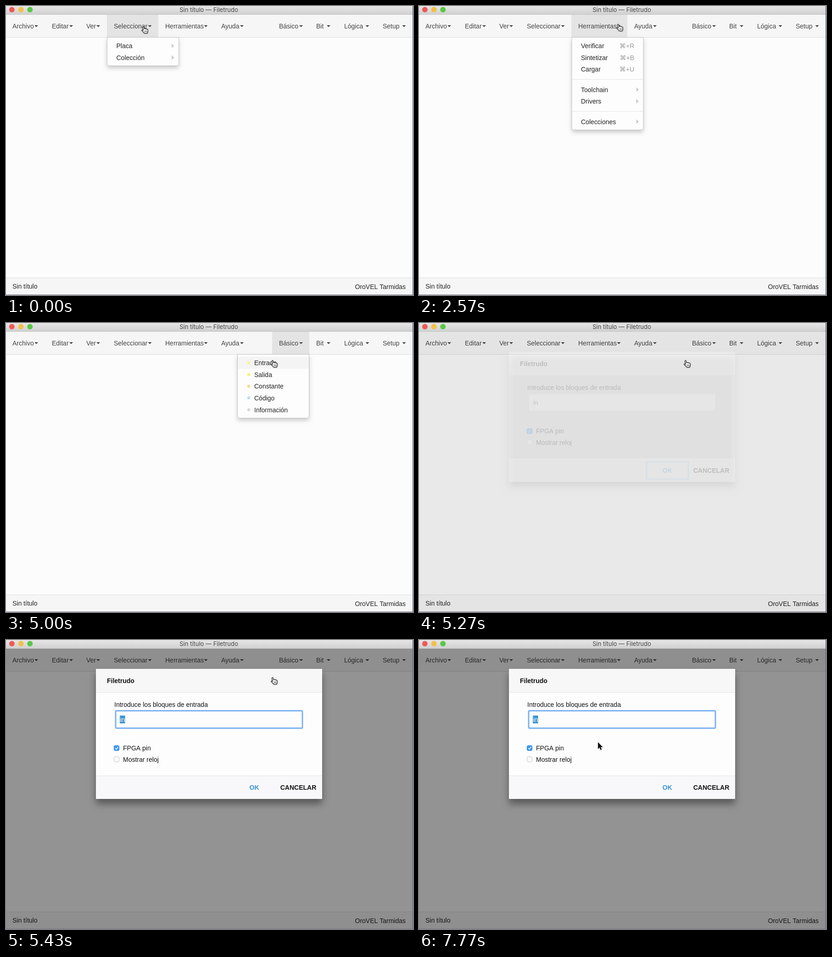
Recreate the animation shown at these times as an HTML page with a canvas. Size 887 px wide and 631 px high, loop 8 s.

```html
<!DOCTYPE html>
<html lang="es">
<head>
<meta charset="utf-8">
<title>Sin título</title>
<style>
html, body { margin: 0; width: 100%; height: 100%; overflow: hidden; }
canvas { display: block; }
</style>
</head>
<body>
<canvas width="887" height="631"></canvas>
<script>
const W = 887, H = 631, LOOP = 8000;
const ctx = document.querySelector('canvas').getContext('2d');
const SANS = '"Liberation Sans", "DejaVu Sans", sans-serif';
const BODY = '14px ' + SANS, BOLD = 'bold 14px ' + SANS;
const APP = 'Filetrudo';

// label, text x, caret x, highlight left and right
const menus = [
  ['Archivo', 14, 66], ['Editar', 100, 142], ['Ver', 175, 201],
  ['Seleccionar', 235, 313.5, 220, 332],
  ['Herramientas', 347, 435.5, 332, 454],
  ['Ayuda', 469, 514, 454, 532],
  ['Básico', 595, 643, 580, 661],
  ['Bit', 676, 703], ['Lógica', 737, 787.5], ['Setup', 821, 867.5]
];
// items: label, centre y, then a shortcut, a '>' for a submenu, or a bullet colour
const dropdowns = {
  Seleccionar: { x: 220, bottom: 130, items: [['Placa', 87, '>'], ['Colección', 112.5, '>']], lines: [] },
  Herramientas: {
    x: 332.5, bottom: 270, lines: [160, 230],
    items: [['Verificar', 87, '⌘+R'], ['Sintetizar', 112.5, '⌘+B'], ['Cargar', 138, '⌘+U'],
      ['Toolchain', 182.5, '>'], ['Drivers', 208, '>'], ['Colecciones', 252.5, '>']]
  },
  Básico: {
    x: 504, bottom: 207, lines: [],
    items: [['Entrada', 87, '#f7f58a'], ['Salida', 112.5, '#f2f574'], ['Constante', 138, '#f3dc8c'],
      ['Código', 163.5, '#b9dfe6'], ['Información', 189.5, '#d6d6d2']]
  }
};

// time, x, y
const handPath = [[0, 295, 44], [830, 300, 45], [1670, 372, 44], [2570, 430, 39], [2700, 438, 40],
  [3500, 585, 50], [4030, 633, 52], [4230, 633, 52], [4830, 577, 81], [5500, 577, 81]];
const arrowPath = [[5500, 581, 81], [6000, 384, 224], [6100, 381, 226], [6630, 386, 225], [7000, 390, 223]];
const fadePath = [[5255, 0], [5270, 0.17], [5330, 0.84], [5390, 1]];
const ARROW_AT = 5500, MENU_CLOSES = 5200, FOCUS_AT = 5300;

function along(path, t) {
  if (t <= path[0][0]) return path[0].slice(1);
  const i = path.findIndex(p => p[0] > t);
  if (i < 0) return path[path.length - 1].slice(1);
  const a = path[i - 1], b = path[i], k = (t - a[0]) / (b[0] - a[0]);
  return a.slice(1).map((v, n) => v + (b[n + 1] - v) * k);
}

function rect(x, y, w, h, fill) {
  ctx.fillStyle = fill;
  ctx.fillRect(x, y, w, h);
}

function rounded(x, y, w, h, r, fill, stroke, width = 1) {
  ctx.beginPath();
  ctx.roundRect(x, y, w, h, r);
  if (fill) { ctx.fillStyle = fill; ctx.fill(); }
  if (stroke) { ctx.strokeStyle = stroke; ctx.lineWidth = width; ctx.stroke(); }
}

function shadowed(alpha, dy, blur, draw) {
  ctx.save();
  ctx.shadowColor = `rgba(0,0,0,${alpha})`;
  ctx.shadowOffsetY = dy;
  ctx.shadowBlur = blur;
  draw();
  ctx.restore();
}

function dot(x, y, r, fill) {
  ctx.fillStyle = fill;
  ctx.beginPath();
  ctx.arc(x, y, r, 0, 7);
  ctx.fill();
}

function polygon(fill, ...points) {
  ctx.fillStyle = fill;
  ctx.beginPath();
  points.forEach(p => ctx.lineTo(...p));
  ctx.fill();
}

function text(str, x, y, fill = '#222', font = BODY, align = 'left') {
  ctx.font = font;
  ctx.textAlign = align;
  ctx.fillStyle = fill;
  ctx.fillText(str, x, y);
}

function drawTitleBar() {
  const shade = ctx.createLinearGradient(0, 0, 0, 18);
  shade.addColorStop(0, '#e6e6e6');
  shade.addColorStop(1, '#d1d1d1');
  rect(0, 0, W, 18, shade);
  rect(0, 18, W, 1, '#c2c2c2');
  ['#ed5b57', '#f4bf4a', '#57c845'].forEach((c, i) => dot(12.8 + i * 19.7, 8, 6, c));
  text('Sin título — ' + APP, 442, 13, '#444', '13px Inter, Roboto, sans-serif', 'center');
}

function drawWindow(active) {
  rect(0, 0, W, H, '#fcfcfd');
  rect(0, 19, W, 49, '#f6f6f7');
  rect(0, 68, W, 1, '#dcdcde');
  if (active) rect(active[3], 19, active[4] - active[3], 49, '#e4e4e5');
  for (const [label, x, caret] of menus) {
    text(label, x, 48.5, '#444');
    polygon('#444', [caret - 4, 42], [caret + 4, 42], [caret, 46]);
  }
  rect(0, 593, W, 37, '#f6f6f7');
  rect(0, 593, W, 1, '#e0e0e2');
  text('Sin título', 14, 617);
  text('OroVEL Tarmidas', 871, 618, '#222', BODY, 'right');
}

function drawDropdown({ x, bottom, items, lines }, pointerY) {
  shadowed(0.2, 5, 10, () => rounded(x + 0.5, 68.5, 156, bottom - 68, [0, 0, 4, 4], '#fdfdfd'));
  rounded(x + 0.5, 68.5, 156, bottom - 68, [0, 0, 4, 4], null, '#c4c4c6');
  lines.forEach(y => rect(x + 1, y - 0.5, 155, 1, '#e2e2e4'));
  for (const [label, y, extra] of items) {
    const bullet = extra[0] === '#';
    if (Math.abs(pointerY - y) < 12.8) rect(x + 1, y - 13, 155, 26, '#f4f4f5');
    text(label, x + (bullet ? 37 : 20.5), y + 5);
    if (bullet) dot(x + 25, y, 3.2, extra);
    else if (extra === '>') polygon('#ccc', [x + 141, y - 5], [x + 146.5, y], [x + 141, y + 5]);
    else text(extra, x + 136.5, y + 5, '#999', BODY, 'right');
  }
}

function drawCheckbox(y, label, checked) {
  rounded(235.5, y - 5.5, 11, 11, 2.5, checked ? '#3b97f8' : '#fff', checked ? '#3189ea' : '#bdbdbd');
  if (checked) {
    ctx.strokeStyle = '#fff';
    ctx.lineWidth = 1.6;
    ctx.stroke(new Path2D(`M238.3 ${y + 0.3}l2 2.4 4-5.4`));
  }
  text(label, 255, y + 5, '#111');
}

function drawDialog(inputFocused) {
  shadowed(0.4, 11, 16, () => rounded(196, 63, 493, 284, 2, '#fdfdfe'));
  rect(196, 63, 493, 51, '#f7f7f8');
  rect(196, 114, 493, 1, '#e6e6e8');
  rect(196, 296, 493, 51, '#f8f8fa');
  rect(196, 296, 493, 1, '#e6e6e8');
  text(APP, 220, 94, '#111', BOLD);
  text('Introduce los bloques de entrada', 236, 146, '#111');

  rounded(239.5, 155.5, 406, 36, 1, '#fdfdfd', '#dedee0');
  if (inputFocused) {
    rounded(239, 154.5, 407, 38, 2, null, '#7db2f2', 3);
    rect(248, 165, 11.5, 17, '#3a94cd');
  } else {
    rounded(496, 303, 91, 38, 1, null, '#9cc9ee', 3);
  }
  text('in', 248.5, 178.5, inputFocused ? '#fff' : '#333');

  drawCheckbox(236, 'FPGA pin', true);
  drawCheckbox(260.5, 'Mostrar reloj', false);
  text('OK', 541, 326.5, '#3892cf', BOLD, 'center');
  text('CANCELAR', 637, 326.5, '#111', BOLD, 'center');
}

// The dialog fades together with its backdrop.
function drawModal(opacity, inputFocused) {
  ctx.globalAlpha = opacity;
  rect(0, 19, W, H - 19, 'rgba(0,0,0,.42)');
  drawDialog(inputFocused);
  ctx.globalAlpha = 1;
}

const handShape = new Path2D('M4.2 9.5L2.6 3C2 .6 4.6-.1 5.2 2.2L6.2 6C6.6 4.8 8.6 4.8 9 6.2' +
  'C9.6 5.2 11.2 5.4 11.6 6.8C12.6 6 14 6.8 14.2 8.2C14.6 10.6 14.4 12 13 15.5H6.4' +
  'C5.4 13.4 2.6 11.4 1 9.8C.2 8.6 2 7.4 4.2 9.5Z');
const handCreases = new Path2D('M7.4 9.5v3.5M9.4 9.5v3.5M11.4 9.5v3.5');
const arrowShape = new Path2D('M0 0V15L3.4 11.8L5.8 17.2L8.3 16.1L6 10.9H10.5Z');

function drawCursor(x, y, hand) {
  ctx.save();
  ctx.translate(x, y);
  shadowed(0.3, 1, 3, () => {
    ctx.fillStyle = '#fff';
    ctx.fill(hand ? handShape : arrowShape);
  });
  ctx.lineWidth = 1.4;
  ctx.lineJoin = 'round';
  ctx.strokeStyle = hand ? '#333' : '#fff';
  ctx.stroke(hand ? handShape : arrowShape);
  if (hand) {
    ctx.lineWidth = 0.9;
    ctx.stroke(handCreases);
  } else {
    ctx.fillStyle = '#111';
    ctx.fill(arrowShape);
  }
  ctx.restore();
}

function draw(t) {
  const hand = t < ARROW_AT;
  const [x, y] = along(hand ? handPath : arrowPath, t);
  const active = t < MENU_CLOSES && menus.find(m => x + 4 >= m[3] && x + 4 < m[4]);
  const [opacity] = along(fadePath, t);

  drawWindow(active);
  const dropdown = active && dropdowns[active[0]];
  if (dropdown) drawDropdown(dropdown, y + 1);
  if (opacity > 0) drawModal(opacity, t >= FOCUS_AT);
  drawTitleBar();
  rect(W - 1, 0, 1, H, '#52628f');
  rect(0, H - 1, W, 1, '#77778c');
  drawCursor(x, y, hand);
}

function frame() {
  draw(performance.now() % LOOP);
  requestAnimationFrame(frame);
}
frame();
</script>
</body>
</html>
```
